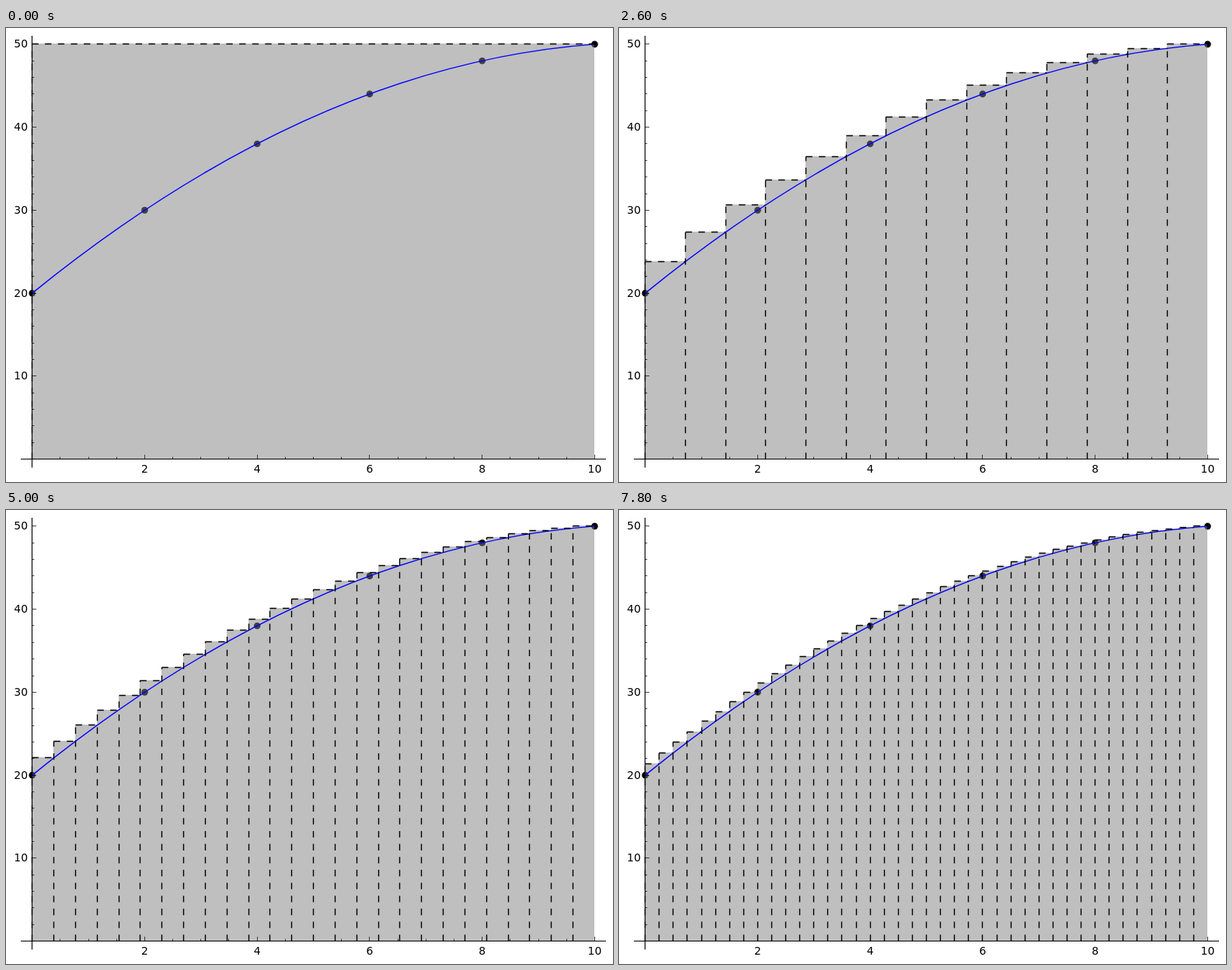
These frames come from a looping animation (781x584 px, 8000 ms). An HTML page:

```html
<!DOCTYPE html>
<html lang="en">
<head>
<meta charset="utf-8">
<title>Upper Riemann sums</title>
<style>
  html, body { margin: 0; width: 100%; height: 100%; overflow: hidden; background: #fff; }
  svg { display: block; width: 781px; height: 584px; }
  text { font: 13.9px "DejaVu Sans", sans-serif; }
</style>
</head>
<body>
<svg viewBox="0 0 781 584">
  <g id="dots"></g>
  <path id="bars" fill="#808080" fill-opacity=".5"/>
  <path id="curve" fill="none" stroke="#00f" stroke-width="1.39"/>
  <path id="edges" fill="none" stroke="#000" stroke-width="1.39" stroke-dasharray="8.33"/>
  <path id="ticks" stroke="#000" stroke-width=".7"/>
  <path id="axes" stroke="#000" stroke-width="1.11"/>
  <g id="labels"></g>
</svg>
<script>
const STEP = 200, COUNT = 40;
const $ = id => document.getElementById(id);
const f = x => 20 + 5.5 * x - 0.25 * x * x;
const px = x => 33.7 + 72.37 * x;
const py = y => 554.6 - 10.675 * y;
const snap = v => Math.floor(v) + 0.5;
const sx = x => snap(px(x));
const sy = y => snap(py(y));

function add(parent, tag, attrs, text = '') {
  const el = document.createElementNS('http://www.w3.org/2000/svg', tag);
  for (const key in attrs) el.setAttribute(key, attrs[key]);
  el.textContent = text;
  parent.append(el);
}

function drawChart() {
  for (let x = 0; x <= 10; x += 2)
    add($('dots'), 'circle', { cx: px(x), cy: py(f(x)), r: 4.3 });

  // A quadratic Bezier reproduces the parabola exactly.
  $('curve').setAttribute('d',
    `M${px(0)} ${py(20)}Q${px(5)} ${py(47.5)} ${px(10)} ${py(50)}`);

  let d = '';
  for (let x = 0.5; x <= 10; x += 0.5)
    d += `M${sx(x)} 554.5v${x % 2 ? -2.8 : -5.6}`;
  for (let y = 2; y <= 50; y += 2)
    d += `M33.5 ${sy(y)}h${y % 10 ? 2.8 : 5.6}`;
  $('ticks').setAttribute('d', d);
  $('axes').setAttribute('d', 'M19 554.5H772M33.5 10V565.5');

  for (let i = 1; i <= 5; i++) {
    add($('labels'), 'text', { x: px(2 * i), y: 571.5, 'text-anchor': 'middle' }, 2 * i);
    add($('labels'), 'text', { x: 28, y: sy(10 * i) + 4.5, 'text-anchor': 'end' }, 10 * i);
  }
}

function drawBars(n) {
  let fill = '', edges = '';
  for (let i = 0; i < n; i++) {
    const left = sx(10 * i / n), right = sx(10 * (i + 1) / n);
    const top = sy(f(10 * (i + 1) / n));
    fill += `M${left - 0.5} 554V${top - 0.5}H${right - 0.5}V554Z`;
    edges += `M${left} 554.5V${top}M${left} ${top}H${right}`;
  }
  $('bars').setAttribute('d', fill);
  $('edges').setAttribute('d', edges);
}

let shown = 0;
function update() {
  const n = 1 + Math.floor(performance.now() / STEP) % COUNT;
  if (n !== shown) drawBars(shown = n);
  requestAnimationFrame(update);
}

drawChart();
update();
</script>
</body>
</html>
```
